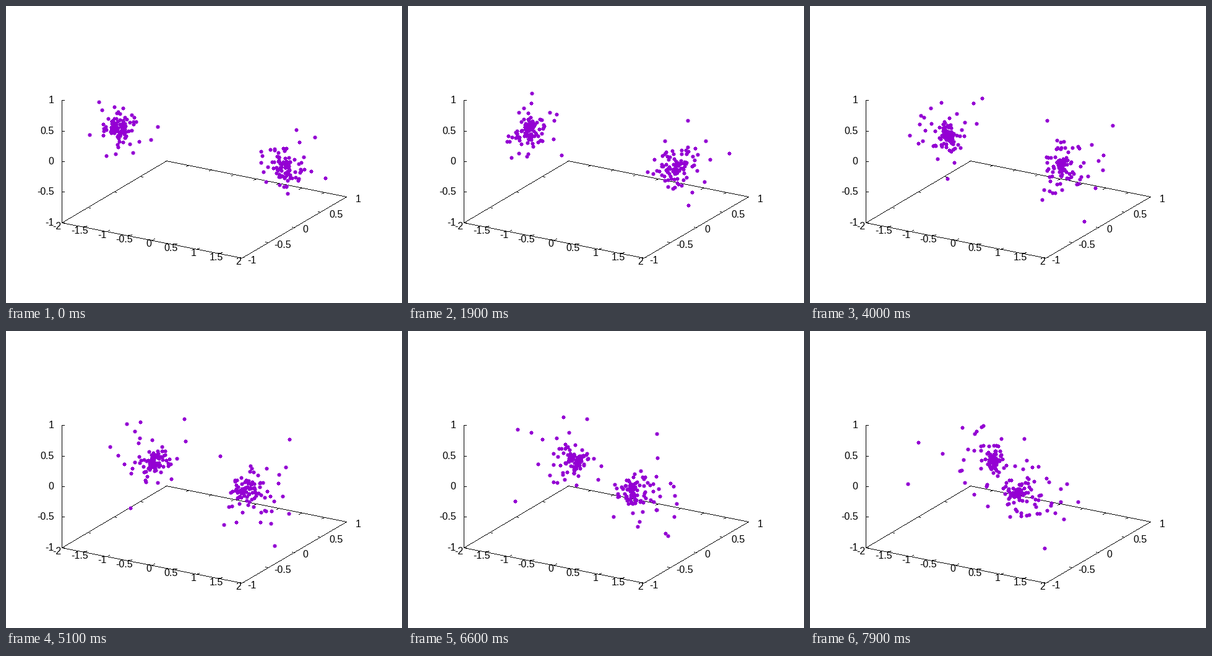
Animation, 640 px wide and 480 px high, one loop 8000 ms. Source, as a matplotlib script:

```python
import numpy as np
import matplotlib.pyplot as plt
from matplotlib.animation import FuncAnimation

W, H, DPI = 640, 480, 100
FRAMES, STEP = 80, 100
BODIES = 95
FONT_PX = 16
BLACK, VIOLET = (0, 0, 0), (148, 0, 211)
plt.rcParams["font.family"] = "Liberation Sans"

# Offsets of the pixels in a hard-edged dot of radius 3
dy, dx = np.mgrid[-3:4, -3:4]
inside = dx ** 2 + dy ** 2 <= 9
DOT = np.column_stack([dx[inside], dy[inside]])


class Cluster:
    """Bodies on tilted orbits around a moving centre."""

    def __init__(self, seed, center):
        rng = np.random.default_rng(seed)
        self.center = center
        self.size = np.clip(rng.normal(size=BODIES), -1.9, 1.9)
        self.phase = rng.uniform(0, 2 * np.pi, BODIES)
        u = rng.normal(size=(BODIES, 3))
        v = np.cross(u, rng.normal(size=(BODIES, 3)))
        self.u = (u / np.linalg.norm(u, axis=1, keepdims=True))[:, :2]
        self.v = (v / np.linalg.norm(v, axis=1, keepdims=True))[:, :2]
        self.speed = 26 / (24 * np.exp(0.6 * self.size) + 10)
        self.lag = 0.2 * np.maximum(self.size, 0)

    def points(self, t):
        # the halo widens and trails behind the core
        r = 24 * np.exp((0.6 + 0.03 * t) * self.size)
        a = self.phase + self.speed * t
        orbit = self.u * np.cos(a)[:, None] + self.v * np.sin(a)[:, None]
        center = np.column_stack(self.center(t * (1 - self.lag)))
        return center + r[:, None] * orbit


clusters = [
    Cluster(5, lambda t: (181 + 6 * t + 1.1 * t ** 2, 199 + 1.7 * t)),
    Cluster(12, lambda t: (451 - 8 * t - 0.85 * t ** 2, 261 - 0.2 * t)),
]

fig = plt.figure(figsize=(W / DPI, H / DPI), dpi=DPI, facecolor="white")
ax = fig.add_axes([0, 0, 1, 1])
base = np.full((H, W, 3), 255, np.uint8)


def line(p, q):
    """One-pixel line without smoothing."""
    p, q = np.asarray(p, float), np.asarray(q, float)
    n = int(np.abs(q - p).max()) + 1
    x, y = np.rint(np.linspace(p, q, n)).astype(int).T
    base[y, x] = BLACK


def tick(p, q, f, d):
    start = np.rint(p + (q - p) * f)
    line(start, start + d)


def label(x, y, value, align):
    ax.text(x, y + 5, f"{value:g}", ha=align, va="baseline",
            fontsize=FONT_PX * 72 / DPI, color="black")


left, back, right, front = np.array(
    [(90, 350), (259, 250), (550, 308), (381, 407)], float)
for p, q in ((left, back), (back, right), (right, front), (front, left)):
    line(p, q)
line((90, 152), left)

for i in range(9):
    value = -2 + i / 2
    hang = 3 * (value < 0)
    tick(left, front, i / 8, (4, -2))
    tick(back, right, i / 8, (-4, 2))
    label(85.3 + 36.3 * i - hang, 356 + 7.1 * i, value, "center")
for i in range(5):
    value = -1 + i / 2
    hang = 3 * (value < 0)
    tick(front, right, i / 4, (-4, -1))
    tick(left, back, i / 4, (4, 1))
    label(393.6 + 42.9 * i - hang, 411 - 24.8 * i, value, "left")
    y = round(350 - 49.5 * i)
    line((90, y), (94, y))
    label(77.5, y, value, "right")

screen = ax.imshow(base, extent=(0, W, H, 0), aspect="auto",
                   interpolation="nearest")
ax.set(xlim=(0, W), ylim=(H, 0))
ax.axis("off")


def draw(frame):
    t = frame * STEP / 1000
    pts = np.rint(np.vstack([c.points(t) for c in clusters])).astype(int)
    x, y = (pts[:, None] + DOT).reshape(-1, 2).T
    canvas = base.copy()
    canvas[y, x] = VIOLET
    screen.set_data(canvas)
    return screen,


anim = FuncAnimation(fig, draw, frames=FRAMES, interval=STEP,
                     repeat=True, repeat_delay=0, blit=False)
plt.show()
```
